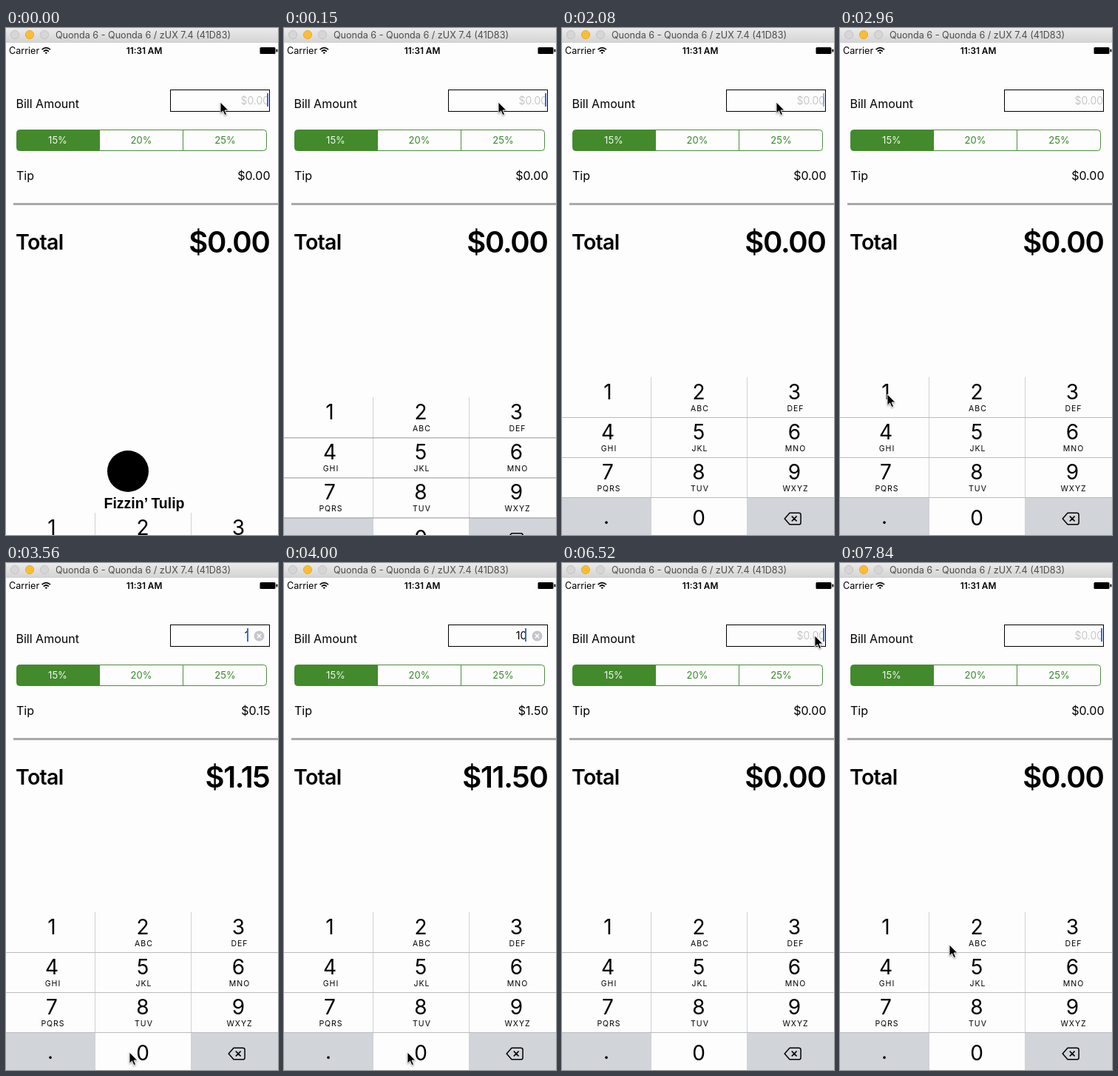
These frames come from a looping animation (368 px wide and 684 px high, 7990 ms). An HTML page:

```html
<!DOCTYPE html>
<html lang="en">
<head>
<meta charset="utf-8">
<title>Tip calculator</title>
<style>
  html, body { margin: 0; width: 100%; height: 100%; overflow: hidden; background: #fdfdfd; }
  svg { display: block; width: 368px; height: 684px; font-family: Inter, Roboto, sans-serif; }
  .mid { text-anchor: middle; }
  .end { text-anchor: end; }
  .digit { font-size: 28px; }
  .letters { font-size: 10.5px; letter-spacing: 1px; }
  .green { fill: #36882a; }
</style>
</head>
<body>
<svg viewBox="0 0 368 684">
  <defs>
    <linearGradient id="bar" x2="0" y2="1">
      <stop stop-color="#ebebeb"/><stop offset="1" stop-color="#d3d3d3"/>
    </linearGradient>
  </defs>
  <rect width="368" height="684" fill="#fdfdfd"/>

  <rect width="368" height="20" fill="url(#bar)"/>
  <g stroke-width=".8">
    <circle cx="12" cy="9" r="5.6" fill="#d6d6d6" stroke="#bdbdbd"/>
    <circle cx="32" cy="9" r="5.6" fill="#fdbd30" stroke="#e0a02a"/>
    <circle cx="52" cy="9" r="5.6" fill="#d6d6d6" stroke="#bdbdbd"/>
  </g>
  <text x="185.5" y="14" class="mid" font-size="12.6" fill="#4c4c4c">Quonda 6 - Quonda 6 / zUX 7.4 (41D83)</text>

  <text x="4" y="35" font-size="12.6">Carrier</text>
  <g fill="none" stroke="#000" stroke-width="1.7">
    <path d="M48.6 29.2Q54.3 24.2 60 29.2M50.8 31.6Q54.3 28.4 57.8 31.6"/>
    <path d="M54.3 35L52.6 33.3Q54.3 31.8 56 33.3Z" fill="#000" stroke="none"/>
  </g>
  <text x="187" y="35" class="mid" font-size="11.8" font-weight="600">11:31 AM</text>
  <rect x="343.5" y="26" width="21" height="9" rx="1.5"/>
  <rect x="365.5" y="28.5" width="1.8" height="4" rx=".8"/>

  <text x="13.5" y="108" font-size="16">Bill Amount</text>
  <rect x="222.5" y="83.5" width="134" height="29" fill="#fdfdfd" stroke="#000"/>
  <text id="hint" x="356" y="103" class="end" font-size="14.2" font-weight="300" fill="#b9b9be">$0.00</text>
  <text id="amount" x="328.5" y="102.5" class="end" font-size="14.2"></text>
  <g id="clear">
    <circle cx="342.5" cy="98.5" r="6.9" fill="#c5c5ca"/>
    <path d="M339.8 95.8l5.4 5.4m0-5.4l-5.4 5.4" stroke="#fff" stroke-width="1.4"/>
  </g>
  <rect id="caret" y="88" width="2" height="18" fill="#3a6cd6"/>

  <rect x="14.5" y="137.5" width="338" height="28" rx="4" fill="#fdfdfd" stroke="#4f8a40"/>
  <path d="M127 137.5H18.5a4 4 0 0 0-4 4v20a4 4 0 0 0 4 4H127Z" fill="#428a2b"/>
  <path d="M239.5 138V165" stroke="#4f8a40"/>
  <g class="mid" font-size="13">
    <text x="70" y="156.3" fill="#f2f8ef">15%</text>
    <text x="183" y="156.3" class="green">20%</text>
    <text x="296.5" y="156.3" class="green">25%</text>
  </g>

  <text x="14" y="205" font-size="16">Tip</text>
  <text id="tip" x="357.5" y="205" class="end" font-size="16">$0.00</text>
  <rect x="10" y="236" width="358" height="3" fill="#a9a9a9"/>
  <text x="13" y="299" font-size="28.5" font-weight="600" letter-spacing="-.7">Total</text>
  <text id="total" x="356.5" y="302.5" class="end" font-size="40" font-weight="600" letter-spacing="-1.3">$0.00</text>

  <circle cx="165" cy="598" r="28"/>
  <text x="187" y="648" class="mid" font-size="19.5" font-weight="700" font-family="Liberation Sans, Arial, sans-serif">Fizzin’ Tulip</text>

  <g id="pad"></g>
  <path id="mouse" d="M0 0V15.2L3.5 11.9 6 17.6 8.5 16.5 6 11H10.8Z" stroke="#fff" stroke-width=".9" style="filter:drop-shadow(0 1px 1px #0006)"/>
</svg>
<script>
const LOOP = 7990, TICK = 148;
const el = id => document.getElementById(id);

// Keypad
const colX = [0, 120.5, 250.5, 368], midX = [62, 185, 314.5];
const rowY = [471, 525.5, 579.5, 633.5, 684];
const letters = ["", "ABC", "DEF", "GHI", "JKL", "MNO", "PQRS", "TUV", "WXYZ"];

function cell(col, row, fill, id = "") {
  return `<rect id="${id}" x="${colX[col]}" y="${rowY[row]}" width="${colX[col + 1] - colX[col]}"
    height="${rowY[row + 1] - rowY[row]}" fill="${fill}"/>`;
}
function digit(char, x, y) {
  return `<text class="mid digit" x="${x}" y="${y}">${char}</text>`;
}
let pad = `<rect y="471" width="368" height="213" fill="#fdfdfd"/>`
  + cell(0, 3, "#d1d5da") + cell(2, 3, "#d1d5da")
  + cell(0, 0, "#d1d5da", "key1") + cell(1, 3, "#d1d5da", "key0");
letters.forEach((word, i) => {
  const x = midX[i % 3], y = 501 + 54 * Math.floor(i / 3);
  pad += digit(i + 1, x, y)
    + `<text class="mid letters" x="${x + 1.5}" y="${y + 15.5}">${word}</text>`;
});
pad += digit(".", 60, 669) + digit(0, 185, 671)
  + `<path d="M120.5 471V684M250.5 471V684" stroke="#cfd1d4"/>
  <path id="rules" d="M0 525.5H368M0 579.5H368M0 633.5H368"/>
  <path d="M308 654.2H320.5a2.6 2.6 0 0 1 2.6 2.6V667.2a2.6 2.6 0 0 1-2.6 2.6H308L301.2 662ZM310.8 658.6l6.8 6.8m0-6.8l-6.8 6.8"
    fill="none" stroke="#000" stroke-width="1.5" stroke-linejoin="round"/>`;
el("pad").innerHTML = pad;

// Timelines, counted in ticks
const caret = [[0, 1], [4, .5], [5, 0], [8, 1], [11, .5], [12, 0], [14, .5], [15, 1], [17, .5], [18, 0],
  [21, 1], [33, .15], [34, 0], [35, 1], [41, .5], [42, 0], [44, 1], [47, .5], [48, 0], [50, .5], [51, 1]];
const bill = [[0, 0], [21, 1], [25, 10], [28, 100], [35, 0]];
const pressed = [[0, ""], [21, "key1"], [23, ""], [25, "key0"], [27, ""], [28, "key0"], [30, ""]];
const mouse = [[0, 290, 100], [16, 290, 100], [18, 215, 270], [20, 64, 494], [22, 64, 494],
  [24, 167, 660], [30, 167, 660], [32, 310, 220], [33, 342, 98], [49, 342, 98], [51, 262, 300], [53, 148, 515]];

const held = (steps, k) => steps.filter(s => s[0] <= k).pop()[1];
function along(points, k) {
  const i = points.findIndex(p => p[0] >= k);
  if (i < 1) return points[0].slice(1);
  const [a, ax, ay] = points[i - 1], [b, bx, by] = points[i];
  const f = (k - a) / (b - a);
  return [ax + (bx - ax) * f, ay + (by - ay) * f];
}
const money = v => "$" + v.toFixed(2);

function draw(ms) {
  const k = Math.min(53, Math.floor((ms + 8) / TICK));
  const value = held(bill, k), key = held(pressed, k);
  const slide = k < 5 ? 183 * Math.exp(-k * TICK / 78) : 0;

  el("pad").setAttribute("transform", `translate(0 ${slide.toFixed(2)})`);
  el("rules").setAttribute("stroke", k < 4 ? "#929496" : "#b9bcc0");
  for (const id of ["key0", "key1"]) el(id).style.display = id === key ? "" : "none";

  el("hint").style.display = value ? "none" : "";
  el("clear").style.display = value ? "" : "none";
  el("amount").textContent = value || "";
  el("tip").textContent = money(value * .15);
  el("total").textContent = money(value * 1.15);

  el("caret").setAttribute("x", value ? 326 : 353);
  el("caret").setAttribute("opacity", held(caret, k));
  el("mouse").setAttribute("transform", `translate(${along(mouse, k)})`);
}

function loop() {
  draw(performance.now() % LOOP);
  requestAnimationFrame(loop);
}
loop();
</script>
</body>
</html>
```
